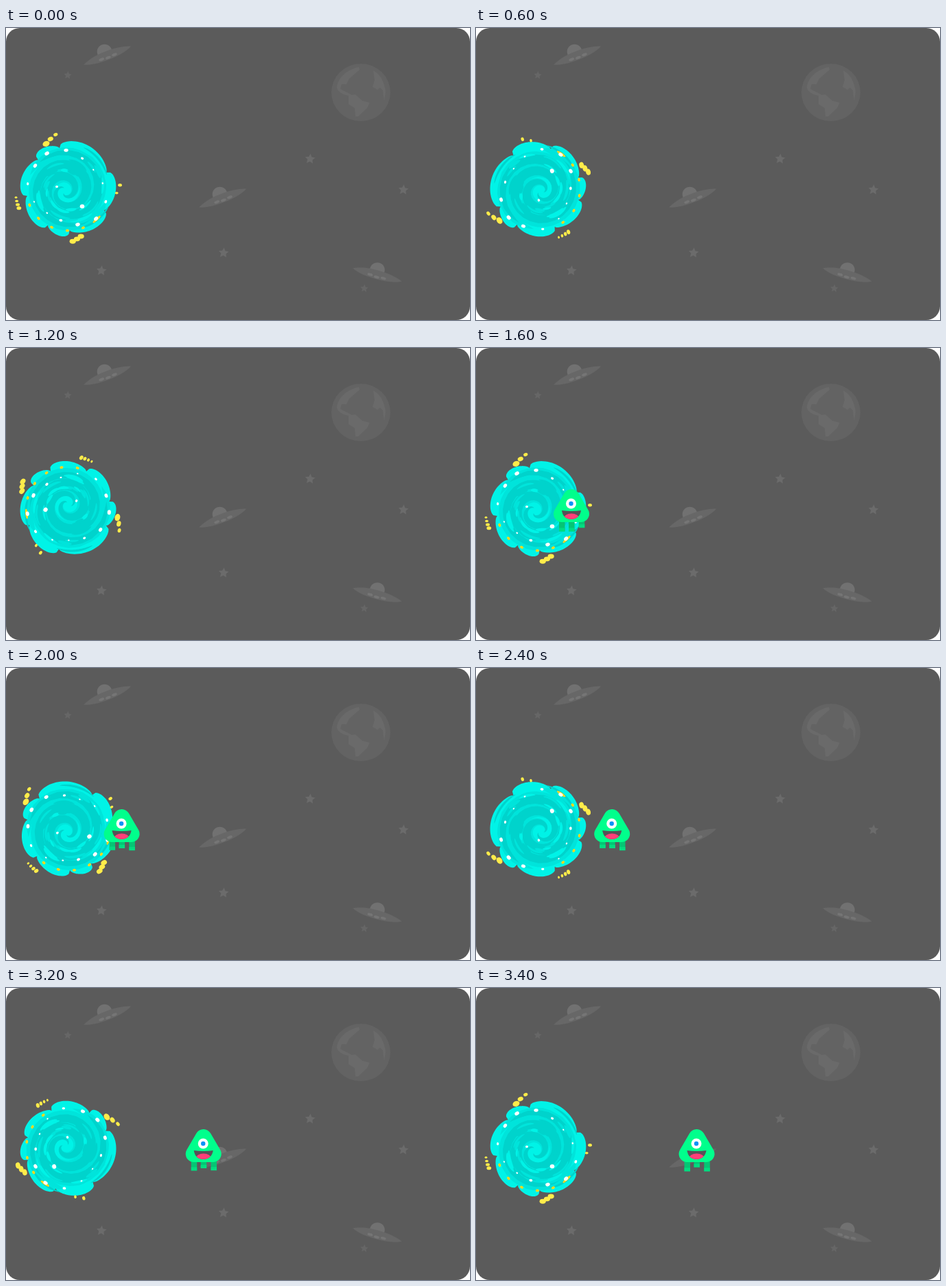
An HTML page with a canvas that plays this animation: 676x426 px, repeating every 3.6 s.

```html
<!DOCTYPE html>
<html lang="en">
<head>
<meta charset="utf-8">
<title>Portal</title>
<style>
html, body { margin: 0; width: 100%; height: 100%; overflow: hidden; background: #fff; }
canvas { display: block; width: 676px; height: 426px; }
</style>
</head>
<body>
<canvas id="stage" width="676" height="426"></canvas>
<script>
const ctx = document.getElementById('stage').getContext('2d');
const TAU = Math.PI * 2, DEG = Math.PI / 180;
const STEP = 200, STEPS = 18, ALIEN_START = 8;
const BRIGHT = '#00f3e7', MID = '#00e4db', DARK = '#00d3cc';
const YELLOW = '#ffec4a', AMBER = '#ffd91c', WHITE = '#ffffff';

function fillPath(color, d) {
  ctx.fillStyle = color;
  ctx.fill(new Path2D(d));
}

function fillPolygon(color, points) {
  ctx.beginPath();
  for (const p of points) ctx.lineTo(...p);
  ctx.closePath();
  ctx.fillStyle = color;
  ctx.fill();
}

function ellipse(color, x, y, rx, ry = rx, tilt = 0) {
  ctx.fillStyle = color;
  ctx.beginPath();
  ctx.ellipse(x, y, rx, ry, tilt, 0, TAU);
  ctx.fill();
}

function placed(x, y, degrees, draw) {
  ctx.save();
  ctx.translate(x, y);
  ctx.rotate(degrees * DEG);
  draw();
  ctx.restore();
}

function polar(r, angle) {
  return [r * Math.cos(angle), r * Math.sin(angle)];
}

// Background

function star(x, y, r = 7.8, color = '#6b6b6b') {
  placed(x, y, 5, () => {
    const points = [];
    for (let i = 0; i < 10; i++) points.push(polar(i % 2 ? r * 0.48 : r, i * TAU / 10 - TAU / 4));
    fillPolygon(color, points);
  });
}

function ufo(x, y, degrees, domeX, domeY) {
  ellipse('#717171', x + domeX, y + domeY, 10.8);
  placed(x, y, degrees, () => {
    fillPath('#676767', 'M-37 1C-24-5-10-6 0-6C14-6 28-4 37 0C28 5 13 7 0 7C-14 7-28 6-37 1Z');
    for (const side of [-1, 0, 1]) ellipse('#757575', side * 10, 4 - Math.abs(side), 4, 2);
  });
}

function globe() {
  ellipse('#636363', 517, 94, 43, 42);
  fillPath('#6a6a6a',
    'M482 87C483 74 495 61 514 57L515 61L500 74L496 82L489 82L487 89L503 97L500 99C491 97 484 94 482 87Z' +
    'M499 98L509 97L519 106L530 109L526 117L513 129L509 129L508 117L499 111Z' +
    'M535 62C545 67 552 79 553 94L551 106L549 91L545 87L541 90L534 86L537 76Z');
}

function background() {
  ctx.fillStyle = '#fff';
  ctx.fillRect(0, 0, 676, 426);
  ctx.beginPath();
  ctx.roundRect(0, 0, 676, 426, 20);
  ctx.fillStyle = '#5b5b5b';
  ctx.fill();
  globe();
  star(139, 354);
  star(317, 328);
  star(443, 191);
  star(579, 236);
  star(90, 69, 6, '#666');
  star(522, 380, 6, '#666');
  ufo(147.5, 39.5, -20.5, -4, -5);
  ufo(315.5, 247.5, -20.5, -4, -5);
  ufo(541, 359.5, 16, 0, -6.5);
}

// Portal, drawn around its hub

// Each lobe swells just after its tip, then thins out clockwise.
function rim() {
  const tips = [-136, -102, -23, 31, 88, 119, 170], points = [];
  tips.forEach((tip, i) => {
    const next = i + 1 < tips.length ? tips[i + 1] : tips[0] + 360;
    for (let k = 0; k < 30; k++) {
      const p = k / 30, swell = Math.sin(Math.PI * Math.pow(p, 0.6));
      points.push(polar(60.5 + 9.5 * Math.pow(swell, 0.6), (tip + (next - tip) * p) * DEG));
    }
  });
  return points;
}

// The spiral starts off-centre and drifts to the hub as it widens.
function swirlPoint(turn, u, shift) {
  const drift = Math.max(0, 1 - u / 11);
  const [x, y] = polar(5 * u + shift, turn - u);
  return [x - 5.5 * drift, y + 5.5 * drift];
}

function arm(color, turn, from, to, width) {
  const outer = [], inner = [];
  for (let i = 0; i <= 40; i++) {
    const p = i / 40, u = from + (to - from) * p;
    const half = width / 2 * Math.pow(Math.sin(Math.PI * p), 0.5) * Math.min(1, 0.25 + u / 8);
    outer.push(swirlPoint(turn, u, half));
    inner.unshift(swirlPoint(turn, u, -half));
  }
  fillPolygon(color, outer.concat(inner));
}

function swirl() {
  arm(MID, 9, 1, 11.8, 26);
  arm(MID, 12.1, 4, 11.8, 24);
  arm(DARK, 9, 0.3, 11.4, 17);
  arm(DARK, 12.1, 1.2, 11.2, 14);
  let seed = 17;
  const random = () => (seed = seed * 16807 % 2147483647) / 2147483647;
  for (let i = 0; i < 36; i++) {
    const u = 5 + random() * 7;
    arm([MID, DARK, BRIGHT][i % 3], random() * TAU, u, u + 0.4 + random() * 0.5, 3 + random() * 2.5);
  }
}

function cluster(count, angle, turn, r, rise, size, growth) {
  for (let i = 0; i < count; i++) {
    const s = size + growth * i;
    ellipse(YELLOW, ...polar(r + rise * i, (angle + turn * i) * DEG), s, s * 0.75, angle < 0 ? -0.4 : 0);
  }
}

function sparks() {
  cluster(3, -116, 6.5, 73, 4, 5.2, -1);
  cluster(2, 5, -9, 71, 4.7, 2.4, 0.5);
  cluster(3, 75, 5, 72, 2.5, 4.6, 0);
  cluster(4, 158.5, 4, 77, 0, 3.4, -0.5);
  for (let i = 0; i < 6; i++) {
    const angle = (47 + 22 * i) * DEG;
    ellipse(AMBER, ...polar(61, angle), 1.9, i ? 2.6 : 7.5, angle);
  }
  for (let i = 0; i < 13; i++) {
    const angle = (28 * i - 121) * DEG, size = 2.4 + 1.1 * Math.cos(i - 6.5);
    ellipse(WHITE, ...polar(53 + 7 * Math.cos(i * 1.1), angle), size * 0.75, size, angle);
  }
  ellipse(WHITE, -16.5, -3, 2, 1.7);
  ellipse(WHITE, 20.5, 25.8, 3.3, 3);
}

const portalRim = rim();

function portal(pose) {
  placed(90.5, 234.5, -30 * pose - 1.5 * pose * pose, () => {
    fillPolygon(BRIGHT, portalRim);
    swirl();
    sparks();
  });
}

// Alien

function leg(x, bottom) {
  ctx.fillStyle = '#05c574';
  ctx.fillRect(x, 250, 8.5, bottom - 250);
  ctx.fillStyle = '#00dd80';
  ctx.fillRect(x, bottom - 5, 8.5, 5);
}

// A steady walk that speeds up over the last steps.
function alienX(step) {
  return 139 + 14.8 * step + 13.2 * Math.pow(Math.max(0, step - 6), 1.2);
}

function alien(step) {
  const swing = Math.cos(TAU * step / 6);
  placed(alienX(step), 0, 0, () => {
    leg(-18, 265 + 2.5 * Math.cos(TAU * step / 9.5));
    leg(-4, 264.5 + 3 * swing);
    leg(10.8, 264.8 - 2.6 * swing);

    ctx.strokeStyle = '#00ff8c';
    ctx.lineJoin = 'round';
    ctx.lineWidth = 24;
    fillPolygon('#00ff8c', [[0, 218], [14, 242], [-14, 242]]);
    ctx.stroke();

    ellipse('#fff', -0.5, 227, 7.5);
    ellipse('#0b93f6', -0.5, 227, 3.2);

    const mouth = new Path2D('M-14 237Q0 239 14 237C13 245 7 250 0 250C-8 250-13 245-14 237Z');
    ctx.fillStyle = '#575257';
    ctx.fill(mouth);
    ctx.clip(mouth);
    ellipse('#ff3f78', 0, 248, 11, 6.5);
  });
}

function render(now) {
  const step = Math.floor(now / STEP) % STEPS;
  // The portal holds one pose for two steps before its second turn.
  const pose = (step < 10 ? step : step - 9) % 8;
  background();
  portal(pose);
  if (step >= ALIEN_START) alien(step - ALIEN_START);
}

const start = performance.now();
function tick() {
  render(performance.now() - start);
  requestAnimationFrame(tick);
}
tick();
</script>
</body>
</html>
```
